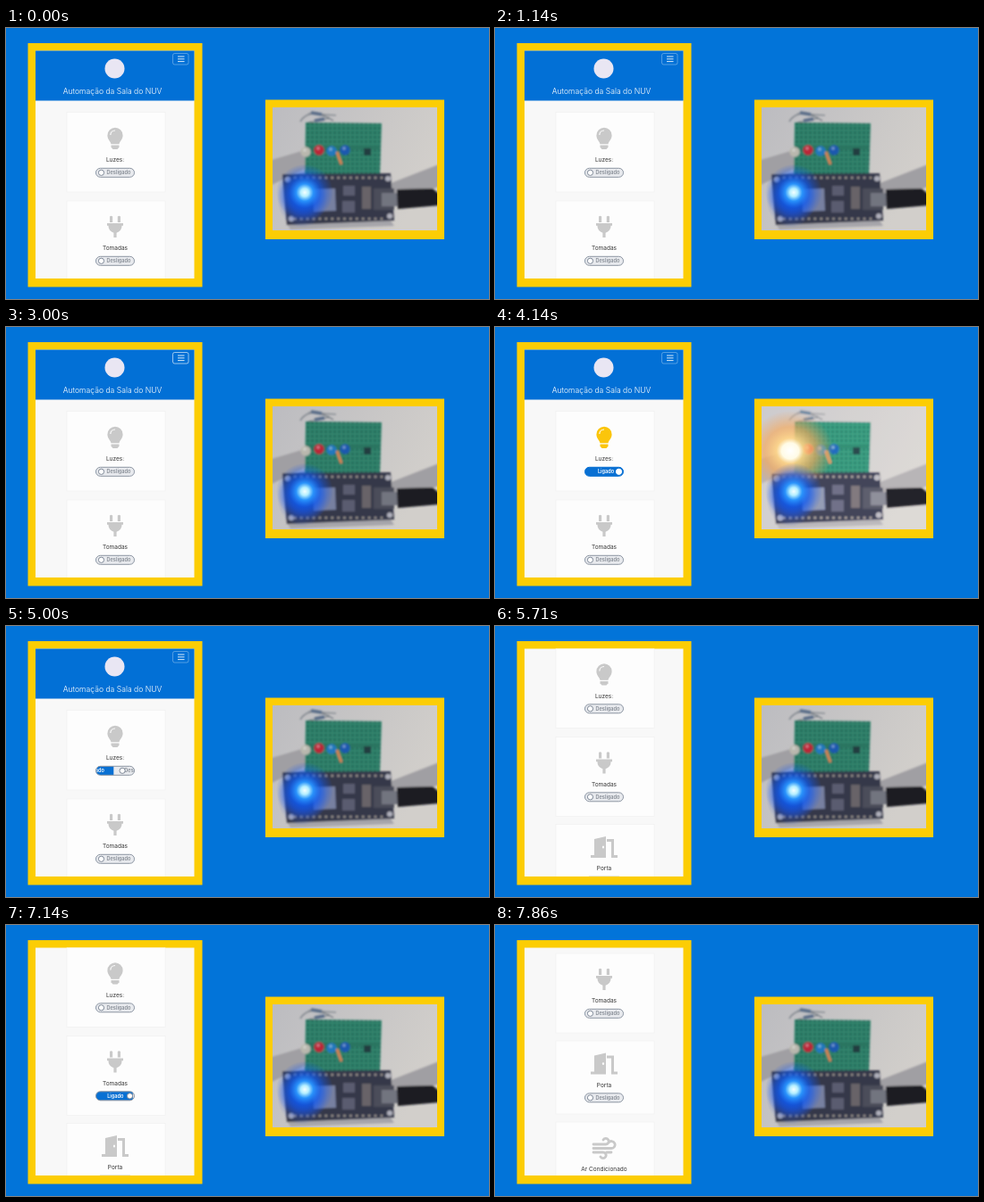
Recreate the animation shown at these times as an HTML page. Size 540 by 304 pixels, loop 8000 ms.

```html
<!DOCTYPE html>
<html lang="pt">
<head>
<meta charset="utf-8">
<title>Automação</title>
<style>
html, body { margin: 0; width: 100%; height: 100%; overflow: hidden; background: #0274d9; }
svg { display: block; width: 540px; height: 304px; }
text { font-family: Inter, "Open Sans", sans-serif; text-anchor: middle; }
.label { font-size: 6.5px; fill: #333; }
.switch text { font-size: 5.6px; font-weight: 600; }
.brighten { mix-blend-mode: overlay; }
</style>
</head>
<body>
<svg id="stage" viewBox="0 0 540 304"></svg>
<script>
const LOOP = 8000;
const GREY = '#c9c9c9';

const icons = {
  bulb: `<path d="M-8.6-3.6A8.6 8.6 0 0 1 8.6-3.6C8.6 1 5 3 4.5 6.2H-4.5C-5 3-8.6 1-8.6-3.6Z"/>
    <path d="M-4.5 7.4H4.5V9.8L2.5 12H-2.5L-4.5 9.8Z"/>
    <path d="M-5.2-4A5.2 5.2 0 0 1 0-9" fill="none" stroke="#fcfcfc" stroke-width="1.2"/>`,
  plug: `<path d="M-6-11.5q1.6-1.5 3.2 0V-5H-6ZM2.8-11.5q1.6-1.5 3.2 0V-5H2.8Z"/>
    <path d="M-9-4H9V-1.2H7.5A7.5 7.5 0 0 1 1.6 6.7V12H-1.6V6.7A7.5 7.5 0 0 1-7.5-1.2H-9Z"/>`,
  door: `<path d="M-15 9H-11V-9L2-12V12H-15Z"/>
    <path d="M3-9H11V9H15V12H8V-6H3Z"/>
    <ellipse cx="-1" cy="0" rx="1.1" ry="1.6" fill="#fcfcfc"/>`,
  wind: `<path d="M-12-4H2A3.3 3.3 0 1 0-1-9M-12 0.5H8A4 4 0 1 0 5-6M-12 5H-1A3.3 3.3 0 1 1-4 10M3 5H8"
    fill="none" stroke="currentColor" stroke-width="2.8" stroke-linecap="round"/>`
};

const cards = [
  { id: 'light', name: 'Luzes:', icon: 'bulb', top: 94.5, height: 89.5, label: 148, lit: '#fbc50b' },
  { id: 'socket', name: 'Tomadas', icon: 'plug', top: 194, height: 89, label: 247, lit: '#b5233b' },
  { id: 'door', name: 'Porta', icon: 'door', top: 292, height: 82, label: 341.5 },
  { id: 'air', name: 'Ar Condicionado', icon: 'wind', top: 383, height: 90, label: 436 }
];

const switchMarkup = `<g class="switch" clip-path="url(#pill)">
    <rect x="-21.5" y="-5.3" width="43" height="10.6" fill="#e8eaee"/>
    <g class="slide">
      <rect x="-64.5" y="-6" width="43" height="12" fill="#0870d3"/>
      <text x="-41" y="2" fill="#fff">Ligado</text>
      <text x="4" y="2" fill="#868c95">Desligado</text>
    </g>
    <circle class="knob" r="3.1" fill="#fff"/>
  </g>
  <rect class="rim" x="-21.5" y="-5" width="43" height="10" rx="5" fill="none"/>`;

const cardMarkup = c => `<g id="${c.id}">
  <rect x="68" y="${c.top}" width="110" height="${c.height}" fill="#fdfdfd" stroke="#f1f1f1" stroke-width=".7"/>
  <g class="icon" transform="translate(122 ${c.label - 24})">${icons[c.icon]}</g>
  <text class="label" x="122" y="${c.label + 2.3}">${c.name}</text>
  <g transform="translate(122 ${c.label + 14.3})">${switchMarkup}</g>
</g>`;

const glow = (id, ...stops) => `<radialGradient id="${id}">${stops.map(([at, color, alpha]) =>
  `<stop offset="${at}" stop-color="${color}" stop-opacity="${alpha}"/>`).join('')}</radialGradient>`;

const led = (x, y, color) => `<circle cx="${x}" cy="${y}" r="5.7" fill="${color}"/>
  <circle cx="${x - 1}" cy="${y - 2}" r="1.7" fill="#fff" opacity=".4"/>`;

const pins = y => `<path d="M322 ${y}H424" stroke="#9b958f" stroke-width="2.6" stroke-dasharray="2.6 4.3"/>`;

const breadboard = 'M335 106L420 107 418 165H334Z';
const controller = 'M309 164L430 163 434 216 314 221Z';

const photo = `<g clip-path="url(#photoArea)" style="isolation: isolate">
  <rect x="297" y="88" width="186" height="141" fill="url(#paper)"/>
  <g filter="url(#soft)">
    <path d="M297 148L334 137V158L297 176ZM420 178L484 153V178L437 196Z" fill="#a09fa3"/>
    <path d="M313 218L430 216 434 222 318 226Z" fill="#a6a5aa"/>
    <path d="M329 105Q340 88 366 104M338 96L369 98M338 106L362 101" fill="none" stroke="#6c747d" stroke-width="1.2"/>
    <path d="M341 95L353 97M345 104L356 102" stroke="#566a86" stroke-width="3.5"/>
    <path d="${breadboard}" fill="#32836c"/>
    <path d="${breadboard}" fill="url(#holes)"/>
    <path d="M336 134H418" stroke="#2b7461" stroke-width="4"/>
    <path id="wash" d="${breadboard}" fill="#9c837f" opacity="0"/>
    ${led(335, 139, '#b9b8ae')}${led(350, 137, '#ba2639')}${led(364, 138, '#2478bd')}${led(379, 137, '#1b58af')}
    <path d="M370 139L375 153" stroke="#d68353" stroke-width="3"/>
    <path d="M400 135H408V143H400Z" fill="#233c40"/>
    <path d="${controller}" fill="#343749"/>
    ${pins(168)}${pins(214)}
    <path d="M343 181L368 180 369 205 344 206Z" fill="#7780a0"/>
    <path d="M377 177H390V188H377ZM376 194H390V207H376Z" fill="#5a5b70"/>
    <path d="M398 178H408V203H398Z" fill="#686467"/>
    <path d="M411 180H434V204H411Z" fill="#4b4d5a"/>
    <path d="M420 185H438V200H420Z" fill="#72747f"/>
    <path d="M437 181L477 180 484 186V199L438 203Z" fill="#1a1b21"/>
    <g fill="#b0b1bc"><circle cx="315" cy="170" r="3"/><circle cx="427" cy="169" r="3"/>
      <circle cx="319" cy="214" r="3"/><circle cx="429" cy="211" r="3"/></g>
  </g>
  <g id="warm">
    <rect class="brighten" x="297" y="88" width="186" height="141" fill="#fff4f0" opacity=".25"/>
    <ellipse cx="330" cy="139" rx="48" ry="45" fill="url(#amber)"/>
  </g>
  <g id="hot">
    <rect class="brighten" x="297" y="88" width="186" height="141" fill="#ffe6ea" opacity=".25"/>
    <path d="${controller}" fill="#75173b" opacity=".48"/>
    <circle cx="350" cy="138" r="56" fill="url(#red)"/>
    <ellipse cx="334" cy="200" rx="24" ry="26" fill="url(#violet)"/>
  </g>
  <ellipse cx="331" cy="192" rx="28" ry="32" fill="url(#halo)"/>
  <circle cx="334" cy="184.5" r="32" fill="url(#blue)"/>
</g>`;

document.getElementById('stage').innerHTML = `<defs>
  <clipPath id="screen"><rect x="33" y="25.5" width="177.5" height="255.5"/></clipPath>
  <clipPath id="photoArea"><rect x="298" y="89" width="184" height="138"/></clipPath>
  <clipPath id="pill"><rect x="-21.5" y="-5" width="43" height="10" rx="5"/></clipPath>
  <filter id="soft"><feGaussianBlur stdDeviation="1"/></filter>
  <linearGradient id="paper" x2="1" y2=".4"><stop stop-color="#bcbcc0"/><stop offset="1" stop-color="#d2cfcb"/></linearGradient>
  <pattern id="holes" width="5" height="5" patternUnits="userSpaceOnUse"><rect x="1.5" y="1.5" width="2" height="2" fill="#1c5549"/></pattern>
  ${glow('halo', [0, '#1450f0', .75], [.5, '#1a50e4', .5], [1, '#2a58e0', 0])}
  ${glow('blue', [0, '#f4ffff', 1], [.14, '#b4efff', 1], [.3, '#2a97ff', .95], [.55, '#0b5cf5', .6], [1, '#0a50ff', 0])}
  ${glow('amber', [0, '#fff', 1], [.2, '#fffbe6', 1], [.32, '#ffd486', .9], [.6, '#f7aa5b', .65], [1, '#f2a35d', 0])}
  ${glow('red', [0, '#fff', 1], [.2, '#fffce0', 1], [.32, '#ffc37a', .97], [.43, '#f7585b', .9], [.66, '#ee2743', .65], [1, '#e81f51', 0])}
  ${glow('violet', [0, '#312ce0', .9], [.5, '#4a2acb', .65], [1, '#782a9c', 0])}
</defs>
<rect width="540" height="304" fill="#0274d9"/>
<rect x="24.5" y="17" width="195" height="273.5" fill="#fccd04"/>
<rect x="33" y="25.5" width="177.5" height="255.5" fill="#f8f8f8"/>
<g clip-path="url(#screen)"><g id="page">
  <rect x="33" y="25" width="178" height="56.5" fill="#0270d6"/>
  <circle cx="121.5" cy="45.5" r="11" fill="#e9e6f3"/>
  <text x="119" y="73.7" font-size="8.6" font-weight="300" fill="#fff">Automação da Sala do NUV</text>
  <rect id="menu" x="186.5" y="28.5" width="17.5" height="12.5" rx="2" fill="none" stroke="#fff"/>
  <path d="M192 32H199.5M192 34.8H199.5M192 37.6H199.5" stroke="#d6e8fa"/>
  ${cards.map(cardMarkup).join('')}
</g></g>
<rect x="290" y="80.5" width="200" height="156.5" fill="#fccd04"/>
${photo}`;

const $ = selector => document.querySelector(selector);
const ramp = (t, from, to) => Math.min(1, Math.max(0, (t - from) / (to - from)));
const ease = p => p * p * (3 - 2 * p);
const pulse = (t, on, off) => ramp(t, on, on + 280) - ramp(t, off, off + 280);

function setCard(card, lit, slide) {
  const root = $('#' + card.id);
  const color = lit ? card.lit : GREY;
  root.querySelector('.icon').setAttribute('fill', color);
  root.querySelector('.icon').setAttribute('color', color);
  root.querySelector('.slide').setAttribute('transform', `translate(${43 * slide} 0)`);
  const knob = root.querySelector('.knob');
  knob.setAttribute('cx', -15.5 + 32 * Math.min(1, slide * 1.6));
  knob.setAttribute('stroke', slide === 1 ? '#fff' : '#7e8897');
  root.querySelector('.rim').setAttribute('stroke', slide === 1 ? '#0870d3' : '#8c95a2');
}

function draw(t) {
  const lightOn = t >= 3720 && t < 4850;
  const socketOn = t >= 6250 && t < 7130;
  setCard(cards[0], lightOn, pulse(t, 3720, 4850));
  setCard(cards[1], socketOn, pulse(t, 6250, 7130));
  setCard(cards[2], false, 0);
  setCard(cards[3], false, 0);

  const scroll = 69.5 * ease(ramp(t, 5130, 5600)) + 92.5 * ease(ramp(t, 7350, 7780));
  $('#page').setAttribute('transform', `translate(0 ${-scroll})`);

  const focused = t >= 2150 && t < 3720;
  $('#menu').setAttribute('stroke-opacity', focused ? .6 : .4);
  $('#menu').setAttribute('stroke-width', focused ? 1 : .8);

  $('#warm').setAttribute('opacity', +lightOn);
  $('#hot').setAttribute('opacity', +socketOn);
  $('#wash').setAttribute('opacity', socketOn ? .5 : 0);
}

const start = performance.now();
function tick() {
  draw((performance.now() - start) % LOOP);
  requestAnimationFrame(tick);
}
tick();
</script>
</body>
</html>
```
